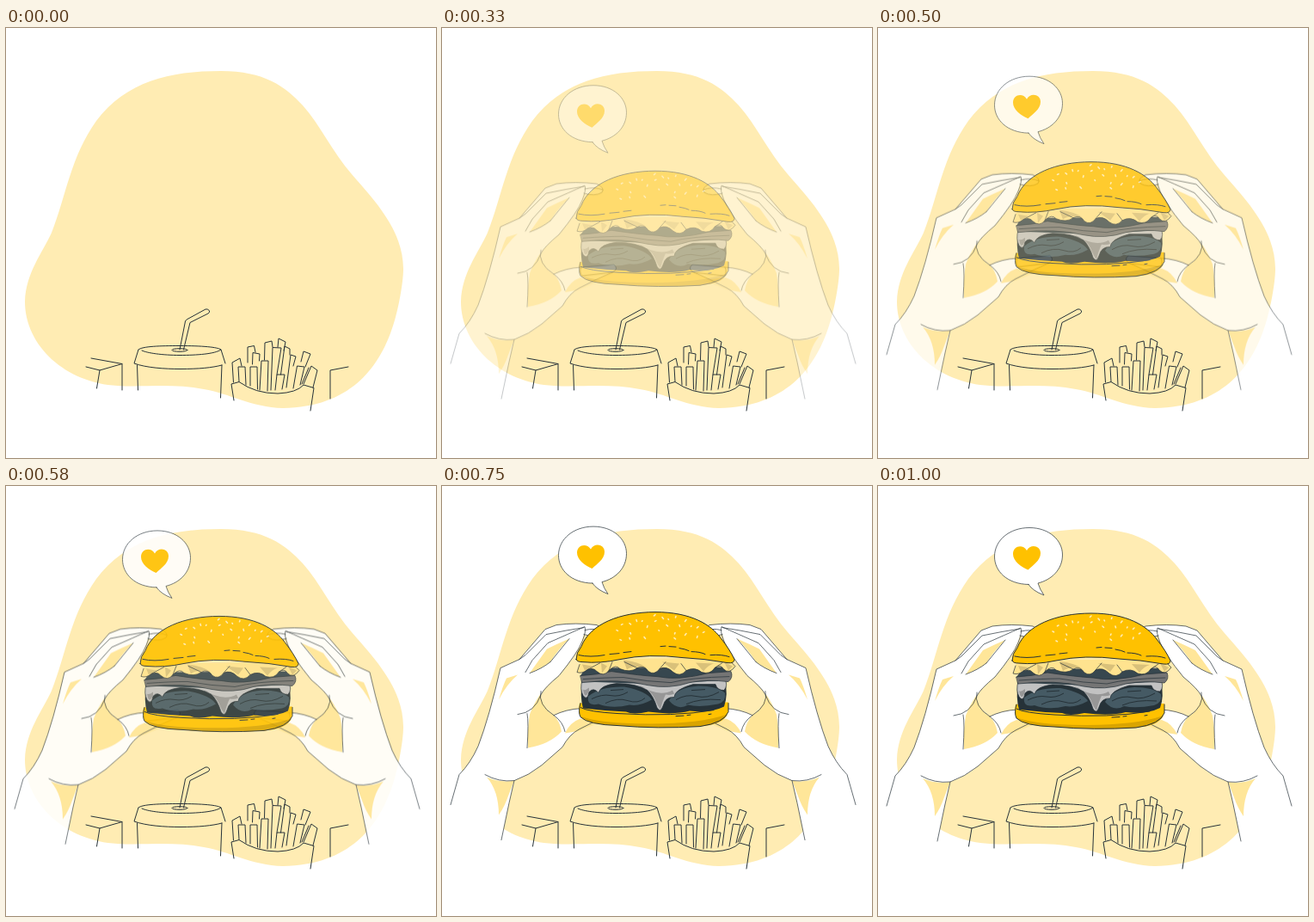
Recreate the animation shown at these times as an HTML page. Size 500 px wide and 500 px high, loop 1040 ms.

```html
<!DOCTYPE html>
<html lang="en">
<head>
<meta charset="utf-8">
<title>Burger</title>
<style>
  html, body { margin: 0; width: 100%; height: 100%; overflow: hidden; background: #fff; }
  svg { display: block; width: 100%; height: 100%; }
  .ink { stroke: #263238; stroke-width: 1; stroke-linecap: round; stroke-linejoin: round; }
  .thin { stroke-width: .7; }
  .none { fill: none; }
  .white { fill: #fff; }
  .pale { fill: #ffecb3; }
  .shade { fill: #ffe699; }
  .amber { fill: #ffc100; }
  .dark { fill: #d9a400; }
  .cream { fill: #ffe38f; }
</style>
</head>
<body>
<svg viewBox="0 0 500 500">
  <path class="pale" d="M250 50C300 50 325 68 345 90C365 112 380 145 402 170C428 200 462 235 462 280C462 298 455 335 447 355C432 395 400 441 322 442C285 441 260 425 230 420C195 413 160 418 130 416C70 413 22 370 22 318C23 285 42 262 53 238C70 195 75 150 105 108C140 62 190 50 250 50Z"/>

  <!-- boxes, cup, fries -->
  <g class="ink none">
    <path d="M99 384L135 390.500V421M135 390.500L109 398L93 394M109 398L105.500 419M398 394L377 398V431"/>
    <path d="M154 374C158 370 180 369.500 202 369.500C228 369.500 246 371 250 374C243 379 222 380.500 202 380.500C182 380.500 164 378 158 375"/>
    <path d="M154 374L149 390C163 395 184 396.500 203 396.500C224 396.500 240 395 251 392M250 374L255 390M152.500 392L153.500 421M251 392L249.500 430"/>
    <ellipse cx="202" cy="374.500" rx="9" ry="1.800"/>
    <path d="M202 374L208.500 341Q209 339.500 211 338.500L232 327Q235 326 236.500 329Q237 331 235 332L214 342.500L206.500 374"/>
    <path d="M265 433L262 414L271 411.500Q290 425 316 425Q338 424 346 415L358 418.500L354 445"/>
    <path d="M264.500 412L263 389L272 384L274 393M271 411L270 394H278L279 415M281 389V371L288.500 369.500L290 377M286.500 391L287 377.500L295 379L294.500 387M284 416V394H292L292.500 420M295 421L297 387H305L304 422M300.500 386L301 366L309 364L310 371"/>
    <path d="M308 421L310 371.500L320 372L315 403M316 371L317 361L325 365L323 375M313 421L315 403H324L321 420M319.500 403L324 370L330 373V380M326 418L331 380L337 382L334 393M334 419L338.500 393L347 394L342 415M343 388L346 376L354 379L348 394M346 414L355 393L362 398L357 418M344 414L352 395"/>
  </g>

  <g class="up">
    <g id="hand">
      <path class="white" d="M10 372L20 337Q33 324 42 304Q55 270 68 213L90 203L120 168L133 163Q155 160 180 163Q190 168 186 173Q178 178 165 174Q163 184 154 199L136 222Q119 236 115 244Q114 256 130 268Q144 261 162 260L200 257Q206 262 198 266L180 274L160 284Q148 290 140 305L116 326Q101 338 84 344L78 370L69 413Z"/>
      <path class="shade" d="M102 219L122 191Q134 185 148 179Q134 193 126 206Q115 214 102 219ZM66 250Q71 233 75 225L88 221Q75 232 66 250ZM114 244Q106 256 102 267Q99 285 100 306Q125 302 139 287Q137 275 130 268Q118 261 114 244ZM143 289Q149 276 161 272L187 275L160 286Q150 288 143 289ZM52 340Q66 356 66 384Q73 374 77 362L84 344Q68 347 52 340Z"/>
      <path class="ink none thin" d="M10 372L20 337Q33 324 42 304Q55 270 68 213L90 203L120 168L133 163Q155 160 180 163Q190 168 186 173Q178 178 165 174M90 203L97 198L121 174Q145 169 165 166M97 218L105 204L123 184Q148 173 166 165Q168 170 163 182Q158 195 136 222Q119 236 115 244Q108 265 88 267M126 206L148 179M166 169Q178 166 187 170M102 219Q116 214 126 206"/>
      <path class="ink none thin" d="M115 240Q111 256 130 268Q141 276 143 287M130 268Q144 261 162 260L200 257Q206 262 198 266L180 274L160 284Q148 290 140 305L116 326Q101 338 84 344Q66 346 50 337M84 344L78 370L69 413M99 266Q101 276 99 306M162 260Q159 265 163 270L198 266"/>
    </g>
    <use href="#hand" transform="matrix(-1 0 0 1 491 0)"/>
  </g>

  <g class="up">
    <!-- bottom bun -->
    <path class="amber" d="M160 254Q158 264 161 270Q170 279 205 280Q250 284 300 281Q328 277 333 264V253Z"/>
    <path class="dark" d="M161 269Q175 275 208 277Q290 281 332 267Q326 279 300 281Q250 284 205 280Q172 279 161 269Z"/>
    <path class="ink none" d="M161 254Q158 264 161 270Q170 279 205 280Q250 284 300 281Q328 277 333 264V254M161 259Q170 264 205 266Q270 270 316 262M272 269L281 268.500M285 268L289 267.500M310 267L313 266.500"/>
    <!-- patty -->
    <path fill="#263238" d="M163 226Q160 246 164 260Q190 263 214 264Q222 268 240 264Q270 268 288 263Q312 266 328 258Q333 244 329 228Z"/>
    <path fill="#455a64" d="M170 246Q185 234 212 235Q238 240 244 250Q230 258 218 256Q198 261 182 255Q168 258 170 246ZM264 251Q272 236 298 234Q320 234 329 242Q331 252 321 255Q300 259 286 256Q274 263 264 251Z"/>
    <path class="none" stroke="#263238" d="M174 249Q186 243 196 245T216 241M190 254Q204 247 216 251T236 248M196 239L211 238M272 250Q284 243 296 246T322 241M284 255Q300 248 324 250M290 239L306 238"/>
    <!-- cheese -->
    <path fill="#c2c2c2" d="M163 225Q160 238 164 245Q169 252 171 241Q176 235 182 242Q184 233 203 231Q226 231 239 239Q246 246 250 259Q254 266 257 257Q260 246 270 247Q270 238 292 232L318 232Q320 239 328 239Q333 233 329 224Z"/>
    <path fill="#979797" d="M227 232Q242 238 247 248Q251 258 254 261Q257 250 260 244Q266 245 270 243L268 239Q252 248 227 232ZM164 238Q166 240 171 236L171 240Q166 251 164 238Z"/>
    <path class="ink none thin" d="M163 227Q160 238 164 245Q169 252 171 241Q176 235 182 242Q184 233 203 231Q226 231 239 239Q246 246 250 259Q254 266 257 257Q260 246 270 247Q270 238 292 232L318 232Q320 239 328 239Q333 233 329 226"/>
    <!-- slices -->
    <path fill="#37474f" d="M161 222Q166 212 184 213L330 212Q339 220 334 227L250 232L165 229Z"/>
    <path fill="#757575" d="M161 222Q180 221 197 217Q231 222 250 223Q274 228 310 219L336 217Q339 224 333 229Q310 226 288 230Q264 238 239 233Q207 225 163 230Z"/>
    <path class="ink none thin" d="M161 222Q180 221 197 217Q231 222 250 223Q274 228 310 219L336 217Q339 224 333 229Q310 226 288 230Q264 238 239 233Q207 225 163 230ZM164 226Q192 224 211 224Q239 229 266 230Q290 224 334 223"/>
    <!-- lettuce -->
    <path class="cream" d="M162 203L157 218Q163 220 169 215Q176 212 180 217Q188 224 194 216Q202 208 207 214Q219 219 227 213Q235 209 240 217Q247 222 253 214Q261 210 269 218Q277 224 284 216Q294 211 302 218Q312 221 317 213Q324 208 327 214Q334 221 341 211L333 201Z"/>
    <path fill="#d9c17a" d="M163 209L175 211L166 216ZM185 207L192 211L186 219ZM211 204Q230 206 238 213Q222 209 215 215ZM256 206L276 208L270 216ZM295 207L316 208Q309 210 304 217ZM328 206L338 211L333 216Z"/>
    <path class="ink none thin" d="M160 209L157 218Q163 220 169 215Q176 212 180 217Q188 224 194 216Q202 208 207 214Q219 219 227 213Q235 209 240 217Q247 222 253 214Q261 210 269 218Q277 224 284 216Q294 211 302 218Q312 221 317 213Q324 208 327 214Q334 221 341 211L336 206M169 215L184 207M194 216L198 206M227 213L212 206M253 214L260 206M284 216L278 208M317 213L326 207"/>
    <!-- top bun -->
    <path id="bun" class="amber" d="M156 203Q156 195 162 188C172 162 207 148 248 148C290 148 313 163 324 178Q335 192 340 203Q340 208 332 207Q304 202 280 201Q240 196 207 203Q184 208 163 206Q157 206 156 203Z"/>
    <path class="dark" d="M156 202Q170 204 202 198Q231 190 254 188Q284 190 305 197Q324 203 340 203Q340 208 332 207Q304 202 280 201Q240 196 207 203Q184 208 163 206Q157 206 156 202Z"/>
    <use href="#bun" class="ink" style="fill:none"/>
    <path class="ink none" d="M159 198Q172 201 189 198M195 197L206 196M211 195L220 194M254 188L260 187.500M264 188L272 188.500M276 190Q283 191 287 193M290 194Q300 194 306 197M312 198Q326 197 334 200"/>
    <path id="seeds" class="none" stroke="#ffecb3" stroke-width="1.600" stroke-linecap="round"/>
  </g>

  <g class="up">
    <path class="ink white thin" d="M175 114.500C150 114 135.500 99 135.500 82C135.500 63 153 48.500 176 48.500C199 48.500 214.500 63 214.500 80C214.500 97 202 109 186 113Q188 120 193 127Q180 122 175 114.500Z"/>
    <path class="amber" d="M174.500 97.500C166 94 157 87 157 79C157 70 168 67 173 75C177 67 189 69 189 78C189 87 180 92 174.500 97.500Z"/>
  </g>
</svg>
<script>
  const LOOP = 1040, FPS = 24;
  const groups = document.querySelectorAll('.up');

  const seeds = [[210,162],[218,161],[226,157],[233,158],[248,151],[256,154],[263,156],[272,153],[284,157],
    [203,169],[219,172],[239,164],[249,158],[261,163],[276,163],[290,164],[298,165],[235,177],[252,169],
    [271,172],[284,173],[207,180],[218,178],[297,176],[305,171],[270,178]];
  document.getElementById('seeds').setAttribute('d', seeds.map(([x, y], i) =>
    `M${x} ${y}l${(i * 7) % 4 - 1.5} ${0.8 + i % 3 * 0.5}`).join(''));

  const bezier = (a, b, s) => 3 * a * s * (1 - s) ** 2 + 3 * b * s * s * (1 - s) + s ** 3;

  // cubic-bezier(.36, -.01, .5, 1.38)
  function ease(x) {
    let lo = 0, hi = 1;
    for (let i = 0; i < 30; i++) {
      const mid = (lo + hi) / 2;
      if (bezier(.36, .5, mid) < x) lo = mid; else hi = mid;
    }
    return bezier(-.01, 1.38, lo);
  }

  function draw(now) {
    const step = Math.floor((now % LOOP + 5) / (LOOP / 25));
    const p = step < 2 ? 0 : ease(Math.min(step / FPS, 1));
    for (const g of groups) {
      g.style.opacity = Math.min(p, 1);
      g.setAttribute('transform', `translate(0 ${30 * (1 - p)})`);
    }
    requestAnimationFrame(() => draw(performance.now()));
  }
  draw(0);
</script>
</body>
</html>
```
